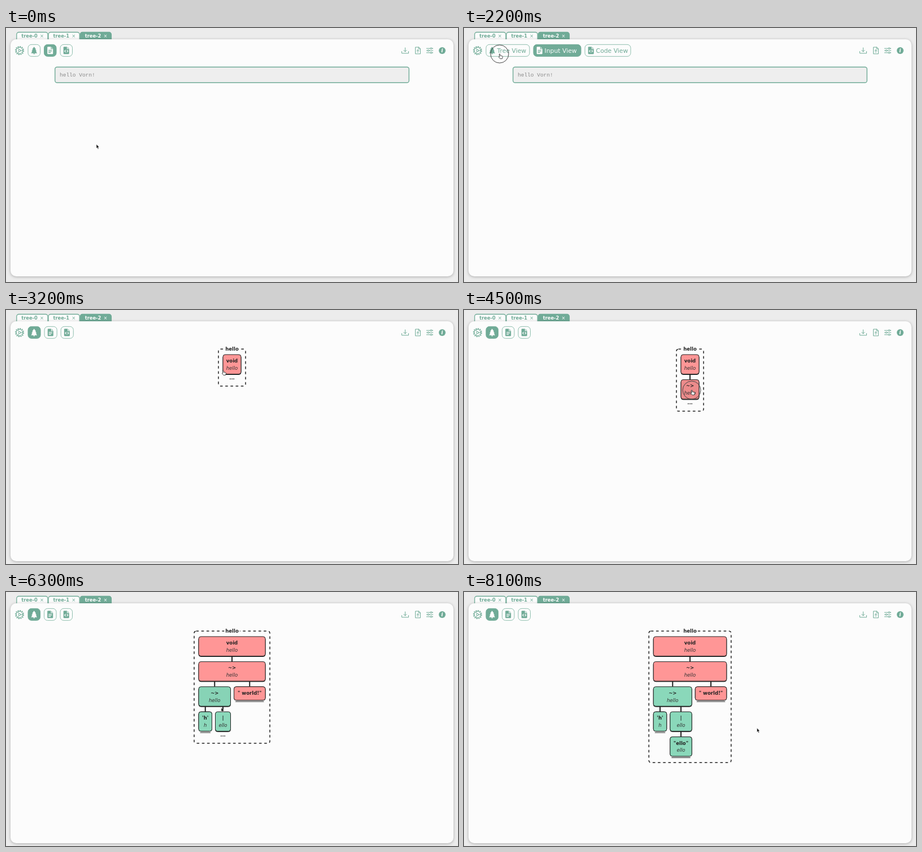
These frames come from a looping animation (800x450 px, 8200 ms). An HTML page:

```html
<!DOCTYPE html>
<html lang="en">
<head>
<meta charset="utf-8">
<title>Tree view</title>
<style>
  html, body { margin: 0; width: 100%; height: 100%; overflow: hidden; background: #ececec; }
  #stage { display: block; width: 800px; height: 450px; --green: #70ab97; --paper: #fcfcfc; }
  text { font-family: "DejaVu Sans", sans-serif; font-size: 8.5px; fill: #222; }
  .bold { font-weight: bold; }
  .mid { text-anchor: middle; }
  .sub { font-style: oblique; fill: #333; }
  .line { fill: none; stroke: var(--green); stroke-width: 1; stroke-linecap: round; stroke-linejoin: round; }
  .panel { fill: var(--paper); filter: drop-shadow(0 1px 2.5px rgba(0, 0, 0, .28)); }
  .tab rect { fill: var(--paper); stroke: var(--green); stroke-width: 1.3; }
  .tab text { font-size: 8.3px; fill: var(--green); }
  .tab.on rect { fill: var(--green); }
  .tab.on text { fill: var(--paper); }
  .button { --ink: var(--green); --back: var(--paper); }
  .button.on { --ink: var(--paper); --back: var(--green); }
  .button > rect { fill: var(--back); stroke: #8fbfae; stroke-width: 1; }
  .button.on > rect { stroke: var(--green); }
  .button text { font-size: 10.8px; fill: var(--ink); }
  .icon { fill: var(--ink); }
  .cut { fill: none; stroke: var(--back); stroke-width: 1.1; }
  .hint { font-family: "Liberation Mono", monospace; font-size: 9.5px; fill: #8a8a8a; }
  .box { stroke: #222; stroke-width: 1; }
  .frame { fill: none; stroke: #222; stroke-width: 1.5; stroke-dasharray: 4.6 4.6; }
</style>
</head>
<body>
<svg id="stage" viewBox="0 0 800 450"></svg>
<script>
const LOOP = 8200, STEP = 100;
const RED = '#ff9696', MINT = '#8ad8ba';
const ROW = 44.4, TOP = 79, GAP = 6;
const stage = document.getElementById('stage');

function set(node, attrs) {
  for (const key in attrs) node.setAttribute(key, attrs[key]);
  return node;
}
function add(parent, tag, attrs = {}, content) {
  const node = set(document.createElementNS('http://www.w3.org/2000/svg', tag), attrs);
  if (content !== undefined) node.textContent = content;
  return parent.appendChild(node);
}
const group = (parent, attrs) => add(parent, 'g', attrs);
const path = (parent, d, cls = 'line') => add(parent, 'path', { d, class: cls });
const at = (x, y) => ({ transform: `translate(${x} ${y})` });
const show = (node, on) => set(node, { visibility: on ? 'visible' : 'hidden' });
const clamp = v => Math.max(0, Math.min(1, v));
const lerp = (a, b, k) => a + (b - a) * k;
const easeOut = (t, start, length) => 1 - (1 - clamp((t - start) / length)) ** 2;
const within = (t, spans) => spans.some(([from, to]) => t >= from && t < to);

// Tabs and panel
['tree-0', 'tree-1', 'tree-2'].forEach((name, i) => {
  const tab = group(stage, { class: i === 2 ? 'tab on' : 'tab', ...at(18.8 + i * 56.2, 0) });
  add(tab, 'rect', { x: 0, y: 7.5, width: 55.2, height: 20, rx: 4 });
  add(tab, 'text', { x: 8.5, y: 17, class: 'bold' }, name);
  add(tab, 'text', { x: 44.7, y: 17, class: 'mid' }, '×');
});
const panel = add(stage, 'rect', { x: 8, y: 20, width: 784, rx: 10, class: 'panel' });

// Gear
const gear = group(stage, at(24, 40));
add(gear, 'circle', { r: 5.7, class: 'line', 'stroke-width': 1.3 });
add(gear, 'circle', { r: 7.1, class: 'line', style: 'stroke-width:1.8;stroke-linecap:butt;stroke-dasharray:2.1 1.62' });
add(gear, 'circle', { r: 1.8, class: 'line' });
path(gear, 'M1.8 0H5.7M-.9 1.6L-2.8 4.9M-.9 -1.6L-2.8 -4.9');

// Right-hand icons
const icons = group(stage);
const icon = (x, d) => path(group(icons, at(x, 40)), d);
icon(706.5, 'M-6 1.5V4.8H6V1.5M0 -5V2M-2.6 -.6L0 2L2.6 -.6');
icon(729, 'M1.3 -6H-4.4V5.8H4.4V-3ZM1.3 -6V-3H4.4M0 3.4V-1.4M-2 .5L0 -1.5L2 .5');
icon(750, 'M-5.7 -3.8H1M4 -3.8H5.7M-5.7 0H-4M-1 0H5.7M-5.7 3.8H1M4 3.8H5.7');
[[2.5, -3.8], [-2.5, 0], [2.5, 3.8]].forEach(([x, y]) =>
  add(icons, 'circle', { cx: 750 + x, cy: 40 + y, r: 1.4, class: 'line' }));
add(icons, 'circle', { cx: 772, cy: 40, r: 6, fill: 'var(--green)' });
add(icons, 'text', { x: 772, y: 43.2, class: 'mid bold', style: 'font:italic bold 9px "DejaVu Serif",serif;fill:#fff' }, 'i');

// View buttons
const PAGE = 'M-3.8 -6.5H1.6L5 -3.1V5.3Q5 6.5 3.8 6.5H-3.8Q-5 6.5 -5 5.3V-5.3Q-5 -6.5 -3.8 -6.5Z';
const FOLD = 'M1.7 -6.5V-3H5';
const views = [
  ['Tree View', 77, 'M0 -6.5L3.4 -2H2.2L4.5 1.5H3.2L5.3 5H.9V6.7H-.9V5H-5.3L-3.2 1.5H-4.5L-2.2 -2H-3.4Z', ''],
  ['Input View', 84, PAGE, FOLD + 'M-3 -.6H3M-3 1.5H3M-3 3.6H1'],
  ['Code View', 81, PAGE, FOLD + 'M-1 -.8L-3 1.2L-1 3.2M1 -.8L3 1.2L1 3.2'],
].map(([label, wide, shape, cuts]) => {
  const root = group(stage);
  const rect = add(root, 'rect', { height: 21, rx: 6 });
  const clip = add(root, 'svg', { height: 21, overflow: 'hidden' });
  const mark = group(clip, at(10.7, 10.5));
  path(mark, shape, 'icon');
  path(mark, cuts, 'cut');
  const text = add(clip, 'text', { x: 19.6, y: 14.6 }, label);
  return { root, rect, clip, text, wide };
});

// Input view
const inputView = group(stage);
add(inputView, 'rect', { x: 86.7, y: 69.2, width: 626.6, height: 27.5, rx: 3.5, fill: '#eee', stroke: 'var(--green)', 'stroke-width': 1.4 });
add(inputView, 'text', { x: 95, y: 86, class: 'hint' }, 'hello Vorn!');

// Tree view
const treeView = group(stage);
const frame = add(treeView, 'rect', { y: 69.3, rx: 3.5, class: 'frame' });
add(treeView, 'rect', { x: 386.2, y: 66, width: 27.6, height: 7, fill: 'var(--paper)' });
add(treeView, 'text', { x: 400, y: 72, class: 'mid bold' }, 'hello');

const nodes = [];
function branch(title, sub, own, fill, opens, kids = []) {
  const g = group(treeView);
  const tall = sub ? 34.5 : 24;
  const node = { g, own, opens, kids, tall };
  node.link = path(g, '', 'link');
  set(node.link, { stroke: '#222', 'stroke-width': 2 });
  node.base = add(g, 'rect', { height: tall, rx: 4, class: 'box', fill: '#222' });
  node.face = add(g, 'rect', { height: tall, rx: 4, class: 'box', fill });
  node.shade = add(g, 'rect', { height: tall, rx: 4, fill: '#000' });
  node.under = path(g, '', 'under');
  set(node.under, { stroke: '#222', 'stroke-width': 1 });
  node.title = add(g, 'text', { class: 'mid bold' }, title);
  node.sub = add(g, 'text', { class: 'mid sub' }, sub);
  node.dots = add(g, 'text', { class: 'mid bold' }, '...');
  nodes.push(node);
  return node;
}
const ello = branch('"ello"', 'ello', 38.5, MINT, 0);
const either = branch('|', 'ello', 27, MINT, 6700, [ello]);
const letter = branch("'h'", 'h', 23.5, MINT, 0);
const inner = branch('~>', 'hello', 32, MINT, 5800, [letter, either]);
const world = branch('" world!"', '', 55.5, RED, 0);
const outer = branch('~>', 'hello', 32, RED, 4750, [inner, world]);
const root = branch('void', 'hello', 32, RED, 3650, [outer]);

function measure(node, t) {
  node.grow = node.opens ? easeOut(t, node.opens, 400) : 0;
  const sum = node.kids.reduce((w, kid) => w + measure(kid, t) + GAP, -GAP);
  return node.w = lerp(node.own, Math.max(node.own, sum), node.grow);
}
function place(node, x, row, alpha) {
  Object.assign(node, { x, y: TOP + row * ROW, alpha });
  for (const kid of node.kids) {
    place(kid, x, row + 1, alpha * node.grow);
    x += kid.w + GAP;
  }
}
function drawNode(node, t) {
  const { x, y, w, tall, alpha, opens } = node;
  const c = x + w / 2;
  set(node.g, { opacity: alpha });
  set(node.link, { d: node === root ? '' : `M${c} ${y}V${y - 9.5}` });
  for (const part of [node.base, node.face, node.shade]) set(part, { x, y, width: w });
  set(node.base, { y: opens ? y + .9 : y });
  set(node.under, { d: opens ? '' : `M${x + 2.5} ${y + tall + 2.4}H${x + w - 2.5}` });
  set(node.title, { x: c, y: y + 14 });
  set(node.sub, { x: c, y: y + 26.7 });
  set(node.dots, { x: c, y: y + 43.5, opacity: opens ? 1 - node.grow : 0 });
  const over = [0, 50, 100].filter(lag => {
    const [px, py] = pointer(t - lag);
    return px > x + .5 && px < x + w && py > y && py < y + tall;
  });
  set(node.shade, { opacity: .075 * over.length / 3 });
}

// Pointer
const moves = [
  [0, 160, 206], [350, 160, 206], [1250, 95, 82], [1750, 63, 46], [2850, 63, 46],
  [3200, 384, 107], [3450, 398, 98], [3700, 398, 98], [4250, 403, 142], [4850, 403, 142],
  [5300, 399.5, 178.5], [5580, 370, 184], [5950, 371, 185], [6300, 381, 205],
  [6550, 385, 226], [7150, 385, 226], [8000, 518.5, 241], [LOOP, 518.5, 241],
];
const hands = [[1400, 2950], [3150, 5000], [5450, 6250], [6450, 7200]];
const presses = [[2000, 2300], [3400, 3650], [4500, 4750], [5600, 5800], [6600, 6800]];

function pointer(t) {
  const i = Math.max(1, moves.findIndex(m => m[0] > t));
  const [t0, x0, y0] = moves[i - 1], [t1, x1, y1] = moves[i];
  const k = clamp((t - t0) / (t1 - t0));
  const s = k * k * (3 - 2 * k);
  return [lerp(x0, x1, s), lerp(y0, y1, s)];
}
const cursor = group(stage);
const ring = add(cursor, 'circle', { r: 16, fill: 'none', stroke: '#444', 'stroke-width': 1 });
const arrow = set(path(cursor, 'M0 0V7.2L1.6 5.8L2.7 8.4L4 7.9L2.9 5.3H5Z', 'arrow'),
  { fill: '#111', stroke: '#fff', 'stroke-width': .5 });
const hand = set(path(cursor, 'M-.7 .4Q.2 -.6 .9 .4L1.3 3L4.7 3.7Q5.6 4 5.4 5.2L4.6 8.4H.8L-1.6 5.4Q-1.4 4.2 0 5Z', 'hand'),
  { fill: '#fff', stroke: '#222', 'stroke-width': .8, 'stroke-linejoin': 'round' });

function drawToolbar(t, inTree) {
  const open = easeOut(t, 1400, 300) - easeOut(t, 2930, 300);
  let x = 39;
  views.forEach((view, i) => {
    const width = lerp(21.5, view.wide, open);
    view.root.setAttribute('class', i === (inTree ? 0 : 1) ? 'button on' : 'button');
    set(view.root, at(x, 29.3));
    set(view.rect, { width });
    set(view.clip, { width });
    set(view.text, { opacity: clamp(open * 2) });
    x += width + 7;
  });
}

function draw(t) {
  const inTree = t >= 2300;
  set(panel, { height: inTree ? 425 : 420 });
  drawToolbar(t, inTree);
  show(inputView, !inTree);
  show(treeView, inTree);

  const width = measure(root, t);
  place(root, 400 - width / 2, 0, 1);
  nodes.forEach(node => drawNode(node, t));
  const rows = root.grow + outer.grow + inner.grow;
  set(frame, { x: root.x - 8, width: width + 16, height: 65.5 + ROW * rows + 34.3 * either.grow });

  const pointing = within(t, hands);
  set(cursor, at(...pointer(t)));
  show(hand, pointing);
  show(arrow, !pointing);
  show(ring, within(t, presses));
}

function tick() {
  const t = performance.now() % LOOP;
  draw(Math.floor(t / STEP) * STEP);
  requestAnimationFrame(tick);
}
tick();
</script>
</body>
</html>
```
